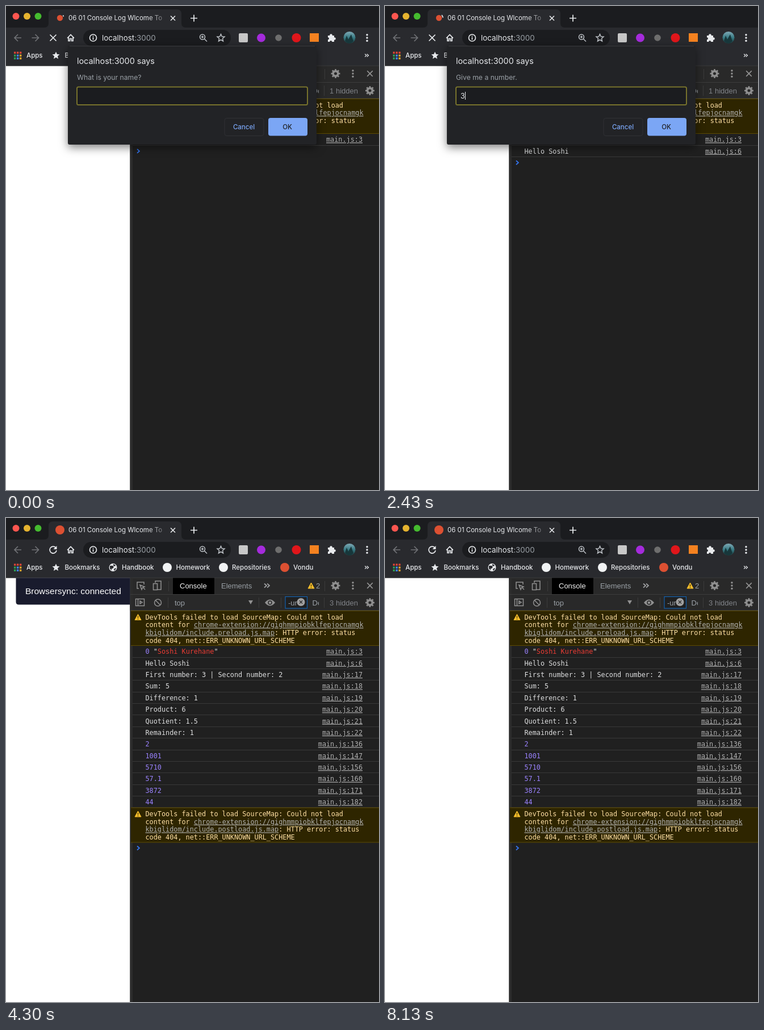
Animation of 657x852 px, one loop 8760 ms. Source, as an HTML page:

```html
<!DOCTYPE html>
<html lang="en">
<head>
<meta charset="utf-8">
<title>Console prompts</title>
<style>
  html, body { margin: 0; width: 100%; height: 100%; overflow: hidden; background: #fff; }
  svg { display: block; }
  text { font: 11.5px Inter, Roboto, sans-serif; fill: #e8eaed; white-space: pre; }
  .mark { font-weight: 500; }
  .tool, .tool text { font: 13px "Liberation Sans", Arial, sans-serif; fill: #9aa0a6; }
  .mono text { font: 11.82px "DejaVu Sans Mono", Menlo, monospace; fill: #dedfe0; }
  .mono .warn { fill: #ffe0a6; }
  .mono .num { fill: #9a82ff; }
  .str { fill: #ea3c34; }
  .link, .mono .src { fill: #b0b0b0; text-decoration: underline; }
  .mono .src { text-anchor: end; }
  .line { fill: none; stroke: #e8eaed; stroke-width: 1.7; }
  .dim { stroke: #707276; }
  .grey { stroke: #919191; stroke-width: 1.5; }
  #dialog { position: absolute; left: 109px; top: 70px; overflow: visible;
    transform-origin: 50% 100%; filter: drop-shadow(0 5px 8px rgba(0,0,0,.5)); }
  #dialog .input { font-size: 12.5px; }
  #dialog .button { font-weight: 500; text-anchor: middle; }
</style>
</head>
<body>
<svg id="stage" width="657" height="852" viewBox="0 0 657 852">
  <defs>
    <linearGradient id="fade" gradientUnits="userSpaceOnUse" x1="250" x2="280">
      <stop stop-color="#e8eaed"/><stop offset="1" stop-color="#e8eaed" stop-opacity=".25"/>
    </linearGradient>
    <linearGradient id="photo" x2="0" y2="1">
      <stop stop-color="#7fa9b5"/><stop offset=".5" stop-color="#397b85"/><stop offset="1" stop-color="#1a3c3d"/>
    </linearGradient>
    <g id="gear" fill="none" stroke="#8f8f8f">
      <circle r="4.4" stroke-width="3.6"/>
      <circle r="6.7" stroke-width="2.6" pathLength="16" stroke-dasharray="1" stroke-dashoffset=".5"/>
    </g>
    <g id="alert">
      <path d="M0-5 5.5 5h-11z" fill="#f5bd2c" stroke="#f5bd2c" stroke-linejoin="round"/>
      <path d="M0-2v3.5M0 2.8v1.4" stroke="#4a3a00" stroke-width="1.4"/>
    </g>
    <path id="star" d="M0-6.5 1.9-2.2 6.5-1.8 3 1.3 4 6 0 3.5-4 6-3 1.3-6.5-1.8-1.9-2.2z"/>
    <path id="cross" d="M-1-1 1 1M1-1-1 1"/>
    <path id="more" d="M-4-3.5 0 0-4 3.5M1-3.5 5 0 1 3.5" class="line"/>
    <g id="dots"><circle cy="-5.2" r="1.7"/><circle r="1.7"/><circle cy="5.2" r="1.7"/></g>
  </defs>

  <!-- Window and tab -->
  <path d="M0 0h657v105.5H0z" fill="#1b1c1f"/>
  <path d="M67 38q8 0 8-8V14q0-8 8-8h218q8 0 8 8v16q0 8 8 8h340v66.5H0V38z" fill="#292a2e"/>
  <path d="M0 105h657" stroke="#3a3b3e"/>
  <circle cx="17.5" cy="18" r="6" fill="#fc5650"/>
  <circle cx="37" cy="18" r="6" fill="#e5b32f"/>
  <circle cx="56.5" cy="18" r="6" fill="#45bb2f"/>
  <circle id="favicon" cx="95" cy="21" fill="#dc5032"/>
  <circle id="spinner" cx="95" cy="21" r="7" pathLength="360" class="line" stroke-linecap="round"/>
  <text x="110" y="25.3" style="fill:url(#fade)">06 01 Console Log Wlcome To</text>
  <g class="line">
    <use href="#cross" transform="translate(294 21.5) scale(4)" stroke-width=".4"/>
    <path d="M325 21.5h12M331 15.5v12"/>
  </g>

  <!-- Address bar -->
  <rect x="136" y="42" width="260" height="28" rx="14" fill="#1b1c1f"/>
  <g class="line">
    <path class="dim" d="M27 56H15m6-6-6 6 6 6M45.5 56h12m-6-6 6 6-6 6"/>
    <path id="stop" d="M77.5 50.5l11 11m0-11-11 11"/>
    <g id="reload"><path d="M87.500 52A6 6 0 1 0 89 57"/><path d="M89.500 49v6h-6z" fill="#e8eaed" stroke="none"/></g>
    <path d="M108 56.5l6-6 6 6M110 55v6.5h2.5v-4h3v4h2.5V55"/>
    <circle cx="153.5" cy="56" r="6"/><path d="M153.5 55v4.5m0-7v1.5"/>
    <g stroke="#bdc1c6" stroke-width="1.5">
      <circle cx="346" cy="54.5" r="4.5"/><path d="M349.5 58l4.500 4.500M343.700 54.500h4.600M346 52.200v4.600"/>
      <use href="#star" x="378.5" y="56"/>
    </g>
  </g>
  <text x="169" y="60.5" style="font-size:13.4px">localhost<tspan fill="#9aa0a6">:3000</tspan></text>
  <rect x="410" y="48" width="16" height="16" rx="2" fill="#c8c8c8"/>
  <circle cx="449.5" cy="56" r="7.5" fill="#a52bdc"/>
  <circle cx="480" cy="56" r="5.8" fill="#6e6e6e"/>
  <circle cx="511.5" cy="56" r="8" fill="#e0161b"/>
  <rect x="535" y="48" width="16" height="15" fill="#f58220"/>
  <g fill="#e8eaed">
    <path d="M567 52h11v11h-3.800a2 2 0 1 0-4 0H567v-3.800a2 2 0 1 0 0-4z"/>
    <circle cx="572.5" cy="51.5" r="2.3"/><circle cx="578.5" cy="57.5" r="2.3"/>
    <use href="#dots" x="636" y="56"/>
  </g>
  <circle cx="605" cy="55.5" r="10.5" fill="url(#photo)"/>
  <path d="M597 62l3-10 3 7 5-9 4 12q-7 7-15 0z" fill="#17373b"/>

  <!-- Bookmarks -->
  <g id="apps"></g>
  <use href="#star" x="88" y="87" fill="#e8eaed"/>
  <circle cx="188.5" cy="87" r="7" fill="#e8eaed"/>
  <path d="M183 84h5l2 2-2 3h-2v3l-3-3zM189 81l4 2-1 2-3-1zM190 90l3-2 1 1-3 4z" fill="#292a2e"/>
  <circle cx="284" cy="87" r="8" fill="#f1f3f4"/>
  <circle cx="383" cy="87" r="8" fill="#f1f3f4"/>
  <circle cx="491" cy="87" r="8" fill="#dc5032"/>
  <g id="bookmarks"></g>
  <use href="#more" transform="translate(635 87) scale(.7)"/>

  <!-- Developer tools -->
  <path d="M218.5 105.5H657V852H218.500z" fill="#202020"/>
  <path d="M218.5 105.5H657v57H218.500z" fill="#292929"/>
  <path d="M218.5 105.500h4.500V852h-4.500z" fill="#2c2c2c"/>
  <path d="M219 134.5h438M219 162.5h438M286.5 111v18M561.5 111v18M285.5 140v18M445.5 140v18M484.5 140v18M560.5 140v18" stroke="#3c3c3c"/>
  <path d="M294 105.5h73v28.500h-73z" fill="#000"/>
  <g class="line grey">
    <path d="M234 124h-3v-11h12v4M236 118l8 3-3.500 1.500L239 126z"/><path d="M241 122l4 4"/>
    <path d="M263 114v-3h10v15h-6M259.500 115.500h7v11h-7z"/>
    <use href="#cross" transform="translate(641 119) scale(4.8)" stroke-width=".35"/>
    <path d="M228.500 142.500h15v12h-15zM232.500 142v13M236 146l4 2.500-4 2.500z"/>
    <circle cx="267.5" cy="149" r="6"/><path d="M263.300 144.800l8.400 8.400"/>
    <path d="M457 149q8-9.500 16 0-8 9.500-16 0z" fill="#919191"/><circle cx="465" cy="149" r="3" fill="#919191" stroke="#292929"/>
  </g>
  <use href="#dots" x="611" y="119" fill="#919191"/>
  <use href="#gear" x="580.5" y="119"/>
  <use href="#gear" x="641" y="149"/>
  <path d="M427 145h8l-4 7z" fill="#919191"/>
  <g class="tool">
    <text x="306" y="124" style="fill:#f3f3f3">Console</text>
    <text x="379" y="124">Elements</text>
    <text id="sources" x="457" y="124">Sources</text>
    <text x="297" y="153.5">top</text>
    <text id="hidden" x="620" y="153.5" text-anchor="end" style="fill:#808388"></text>
    <svg x="539.5" y="140" width="11.5" height="18"><text y="13.5">Default</text></svg>
    <rect x="492" y="138.500" width="38.500" height="20.500" fill="#202020" stroke="#1261b0" stroke-width="1.2"/>
    <text x="497" y="154">-ur</text>
    <circle cx="519.5" cy="148" r="7" fill="#a0a0a0"/>
    <use href="#cross" transform="translate(519.5 148) scale(2.6)" stroke="#242424" stroke-width=".5"/>
    <g id="issues"><use href="#alert" x="537.5" y="119"/><text x="546" y="124">2</text></g>
  </g>
  <use id="overflow" href="#more" y="119" opacity=".62"/>
  <g id="console" class="mono"></g>
  <path id="prompt" d="M231-3.500 235 0 231 3.500" fill="none" stroke="#3475ee" stroke-width="1.7"/>

  <g id="notice">
    <path d="M17.5 105.500h201v47H22.500q-5 0-5-5z" fill="#191b2d"/>
    <text x="34" y="134" style="font:15.5px 'Liberation Sans',Arial,sans-serif;fill:#fff">Browsersync: connected</text>
  </g>
</svg>

<svg id="dialog" width="438" height="174" viewBox="109 70 438 174">
  <rect x="109" y="70" width="438" height="174" rx="3" fill="#222326"/>
  <path d="M112 70.500h432" stroke="#3b3c3f"/>
  <text x="125" y="101.5" style="font-size:14.4px">localhost:3000 says</text>
  <text id="ask" x="125" y="129.5" style="font-size:12.2px;fill:#9aa0a6"></text>
  <rect id="field" x="125" y="142.5" width="406" height="31.5" rx="2.5" fill="#1b1c1f" stroke-width="2"/>
  <text id="answer" class="input" x="133" y="162.5"></text>
  <path id="caret" d="M0 151v14" stroke="#e8eaed"/>
  <rect x="385" y="197.5" width="69" height="31" rx="4" fill="none" stroke="#303135"/>
  <rect x="462" y="197" width="69" height="31.5" rx="4" fill="#7ba6f5"/>
  <text class="button" x="419" y="217" style="fill:#7ba6f5">Cancel</text>
  <text class="button" x="495.5" y="217" style="fill:#202124">OK</text>
</svg>

<script>
const LOOP = 8760, HELLO = 820, LOGS = 3920, LOADED = 4270, NOTICE_END = 6270;
const dialogs = [
  { open: -300, shut: 670, ask: 'What is your name?', answer: 'Soshi', typing: 150 },
  { open: 1000, shut: 2530, ask: 'Give me a number.', answer: '3', typing: 1900 },
  { open: 2760, shut: 3755, ask: 'Give me another number.', answer: '2', typing: 3300 },
];
const $ = id => document.getElementById(id);
const show = (id, on) => { $(id).style.display = on ? '' : 'none'; };
const clamp = x => Math.min(1, Math.max(0, x));
const rowY = i => 235 + 20.38 * i;

const appColours = ['#db4437', '#db4437', '#db4437', '#2f9e52', '#4285f4', '#e2a42c', '#2f9e52', '#4285f4', '#e2a42c'];
$('apps').innerHTML = appColours.map((c, i) =>
  `<rect x="${14 + i % 3 * 5}" y="${80.5 + (i / 3 | 0) * 5}" width="3.4" height="3.4" fill="${c}"/>`).join('');

$('bookmarks').innerHTML = Object.entries({
  Apps: 36, Bookmarks: 103.5, Handbook: 204, Homework: 299.5, Repositories: 398, Vondu: 506,
}).map(([name, x]) => `<text class="mark" x="${x}" y="91">${name}</text>`).join('');

const row = (i, body, line, style = '') => `
  <text class="${style}" x="245.5" y="${rowY(i) + 4.3}">${body}</text>
  <text class="src" x="628" y="${rowY(i) + 4.3}">main.js:${line}</text>
  <path d="M223 ${Math.round(rowY(i) + 9.5) + .5}h434" stroke="#393939"/>`;

const warning = (dy, file) => `<g transform="translate(0 ${dy})">
  <path d="M220 163.500h437v61H220z" fill="#2e2500"/>
  <path d="M220 163.500h437M220 224.500h437" stroke="#5c4a00"/>
  <use href="#alert" x="232.5" y="174.5"/>
  ${['DevTools failed to load SourceMap: Could not load',
     'content for <tspan class="link">chrome-extension://gighmmpiobklfepjocnamgk</tspan>',
     `<tspan class="link">kbiglidom/include.${file}.js.map</tspan>: HTTP error: status`,
     'code 404, net::ERR_UNKNOWN_URL_SCHEME',
    ].map((s, i) => `<text class="warn" x="245.5" y="${178.5 + 13.7 * i}">${s}</text>`).join('')}</g>`;

const messages = [['First number: 3 | Second number: 2', 17], ['Sum: 5', 18], ['Difference: 1', 19],
  ['Product: 6', 20], ['Quotient: 1.5', 21], ['Remainder: 1', 22]];
const numbers = [[2, 136], [1001, 147], [5710, 156], [57.1, 160], [3872, 171], [44, 182]];
$('console').innerHTML = warning(0, 'preload')
  + row(0, '<tspan class="num">0</tspan> "<tspan class="str">Soshi Kurehane</tspan>"', 3)
  + `<g id="hello">${row(1, 'Hello Soshi', 6)}</g>`
  + `<g id="logs">${messages.map(([s, n], i) => row(i + 2, s, n)).join('')}
     ${numbers.map(([s, n], i) => row(i + 8, s, n, 'num')).join('')}</g>`
  + `<g id="late">${warning(346.5, 'postload')}</g>`;

// cubic-bezier(.4, 0, .2, 1), solved by bisection
function ease(x) {
  let lo = 0, hi = 1, s;
  for (let i = 0; i < 16; i++) {
    s = (lo + hi) / 2;
    const at = 1.2 * s * (1 - s) ** 2 + .6 * s * s * (1 - s) + s ** 3;
    if (at < x) lo = s; else hi = s;
  }
  return s * s * (3 - 2 * s);
}

function drawSpinner(t) {
  const arc = 2000 / 3, full = 270;
  const phase = (t - 2690) / arc + 9;   // odd whole values have the shortest arc
  const cycle = Math.floor(phase / 2), part = phase - 2 * cycle;
  const sweep = part < 1 ? full * (ease(part) - 1) : full * ease(part - 1);
  const start = (t - 2470) * 360 / 1568 + (cycle - 4) * full;
  const length = Math.max(8, Math.abs(sweep));
  $('spinner').setAttribute('stroke-dasharray', `${length} 360`);
  $('spinner').setAttribute('transform', `rotate(${sweep < 0 ? start - length : start} 95 21)`);
}

function drawDialog(t) {
  const d = dialogs.find(d => t >= d.open && t < d.shut + 150);
  show('dialog', d);
  if (!d) return;
  const closing = t >= d.shut;
  const k = closing ? (t - d.shut) / 150 : 1 - clamp((t - d.open) / 180);
  $('dialog').style.opacity = closing ? 1 - k * k : 1 - k;
  // The warp narrows the top edge; scaleY keeps the height
  $('dialog').style.transform =
    `translateY(${-11.5 * k}px) perspective(1000px) rotateX(${8 * k}deg) scaleY(${1 + .025 * k})`;
  const typed = Math.max(0, Math.floor((t - d.typing) / 85) + 1);
  $('ask').textContent = d.ask;
  $('answer').textContent = d.answer.slice(0, typed);
  $('field').setAttribute('stroke', closing ? '#2c2d30' : '#77722c');
  show('caret', !closing && t % 1000 > 120 && t % 1000 < 640);
  $('caret').setAttribute('transform', `translate(${Math.round(133 + $('answer').getComputedTextLength()) + .5})`);
}

function draw() {
  const t = performance.now() % LOOP;
  const loaded = t >= LOADED;
  show('stop', !loaded);
  show('reload', loaded);
  show('spinner', !loaded);
  show('sources', !loaded);
  show('issues', loaded);
  show('late', loaded);
  show('hello', t >= HELLO);
  show('logs', t >= LOGS);
  show('notice', loaded && t < NOTICE_END);
  $('favicon').setAttribute('r', loaded ? 8 : 5.2);
  $('overflow').setAttribute('x', loaded ? 459 : 532);
  $('hidden').textContent = `${loaded ? 3 : 1} hidden`;
  const promptY = loaded ? 581 : rowY(t < HELLO ? 1 : t < LOGS ? 2 : 14);
  $('prompt').setAttribute('transform', `translate(0 ${promptY})`);
  drawSpinner(t);
  drawDialog(t);
  requestAnimationFrame(draw);
}
draw();
</script>
</body>
</html>
```
